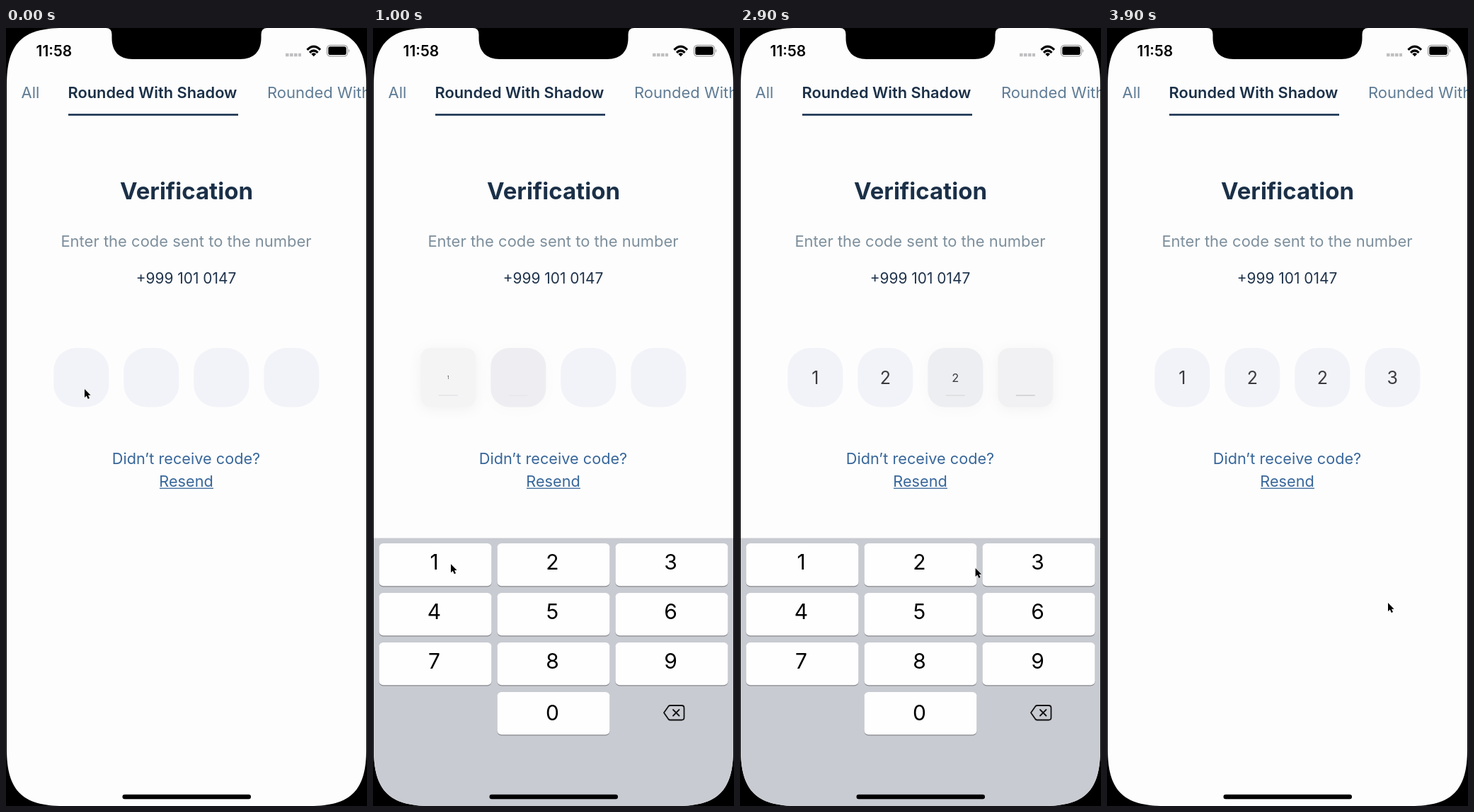
An HTML page for the animation above (4 s loop, 510 px wide and 1099 px high).

```html
<!DOCTYPE html>
<html lang="en">
<head>
<meta charset="utf-8">
<title>Verification</title>
<style>
  html, body { margin: 0; height: 100%; overflow: hidden; background: #000; }
  svg { display: block; width: 100vw; height: 100vh; }
  text { font-family: Inter, sans-serif; font-size: 22px; }
  .mid text { text-anchor: middle; }
  .tab { fill: #5f7c95; }
  .mid .link { fill: #38679a; font-size: 21.7px; }
  #keys text { font-size: 30px; }
  #cells text { font-size: 25px; fill: #3b3b40; }
</style>
</head>
<body>
<svg viewBox="0 0 510 1099">
  <clipPath id="screen">
    <path d="M1 80C1 22 23 0 81 0H429C487 0 509 22 509 80V1019C509 1077 487 1099 429 1099H81C23 1099 1 1077 1 1019Z"/>
  </clipPath>
  <rect width="510" height="1099"/>
  <g clip-path="url(#screen)">
    <rect width="510" height="1099" fill="#fdfdfd"/>

    <text class="tab" x="21.5" y="99">All</text>
    <text x="87.5" y="99" fill="#1b3048" style="font-size:21.8px;font-weight:600">Rounded With Shadow</text>
    <text class="tab" x="369" y="99">Rounded With</text>
    <rect x="88" y="121.2" width="240" height="2.6" fill="#17304f"/>

    <g class="mid">
      <text x="255" y="241.5" fill="#1b3048" style="font-size:33px;font-weight:700">Verification</text>
      <text x="254.5" y="309" fill="#7d8f9c">Enter the code sent to the number</text>
      <text x="254.5" y="361" fill="#20344c" style="font-size:20.9px">+999 101 0147</text>
      <text class="link" x="254.5" y="616">Didn’t receive code?</text>
      <text class="link" x="254.5" y="648">Resend</text>
    </g>
    <rect x="217" y="649.6" width="76" height="1.3" fill="#38679a"/>

    <g id="cells" class="mid"></g>

    <rect id="tint" y="728" width="510" height="371" fill="#faf9ff"/>
    <g id="keyboard">
      <rect y="720.5" width="510" height="380" fill="#c9cbd2"/>
      <g id="keys" class="mid"></g>
      <g fill="none" stroke="#111" stroke-width="1.8" stroke-linejoin="round" stroke-linecap="round">
        <path d="M420 957H436q3.5 0 3.5 3.5V974q0 3.5-3.5 3.5H420q-1.5 0-2.5-1l-6.5-9.2 6.5-9.3q1-1 2.5-1Z"/>
        <path d="M424 963l8.5 8.5m0-8.5l-8.5 8.5"/>
      </g>
    </g>
    <rect x="164.5" y="1082.8" width="181.5" height="6.4" rx="3.2"/>

    <text x="42.5" y="39.7" style="font-size:21px;font-weight:600">11:58</text>
    <path d="M395 38h22" stroke="#bfbfc1" stroke-width="4.6" stroke-dasharray="4.6 1.4"/>
    <g fill="none" stroke="#000" stroke-width="3.2">
      <path d="M425.5 30.8Q434.700 21.5 444 30.8"/>
      <path d="M429 34.8Q434.700 29.3 440.5 34.8"/>
    </g>
    <path d="M431.3 36.7Q434.700 33.8 438.2 36.7L434.7 40.3Z"/>
    <rect x="453.5" y="24.5" width="29" height="15.3" rx="4.5" fill="none" stroke="#a2a2a4" stroke-width="1.3"/>
    <rect x="455.3" y="26.3" width="25.4" height="11.7" rx="2.8"/>
    <path d="M484 29.5q2.4 2.6 0 5.3Z" fill="#a2a2a4"/>
  </g>
  <path d="M141 0Q149.500 0 149.500 9V14C149.500 33 160 44 179 44H331C350 44 360.500 33 360.500 14V9Q360.500 0 369 0Z"/>
  <path id="pointer" d="M0 0V12L2.8 9.5 4.8 14 7 13 5 8.8H8.6Z" stroke="#fff" paint-order="stroke"/>
</svg>

<script>
const LOOP = 4000, OPEN = 60, CLOSE = 3262.5, KEYBOARD_HEIGHT = 379;
const CODE = "1223";
const FOCUS = [OPEN, 930, 1860, 2765, CLOSE];  // cell i is active from FOCUS[i] to FOCUS[i + 1]
const PRESS = 90, FADE = 180;

// Pointer stops: time, x, y
const STOPS = [
  [0, 111, 510], [OPEN, 111, 510], [500, 139, 863], [830, 110, 758], [1100, 110, 757],
  [1500, 244, 759], [1760, 275, 761], [2100, 278, 761], [2780, 282, 762],
  [3020, 382, 764], [3300, 387, 763], [3900, 397, 812], [LOOP, 397, 812]
];

const byId = id => document.getElementById(id);
const clamp = v => Math.min(1, Math.max(0, v));
const mix = (a, b, k) => a + (b - a) * k;
const easeIn = v => clamp(v) ** 1.5;
const smooth = v => v * v * (3 - 2 * v);

function add(parent, tag, attrs, text = "") {
  const node = document.createElementNS("http://www.w3.org/2000/svg", tag);
  for (const name in attrs) node.setAttribute(name, attrs[name]);
  node.textContent = text;
  return parent.appendChild(node);
}

const keys = {};
[..."1234567890"].forEach((digit, i) => {
  const col = i === 9 ? 1 : i % 3, row = Math.floor(i / 3);
  const x = 8.5 + col * 167, y = 728 + row * 70;
  const box = { x, width: 159, height: 60.3, rx: 6 };
  add(byId("keys"), "rect", { ...box, y: y + 1.2, fill: "#85878c" });
  keys[digit] = add(byId("keys"), "rect", { ...box, y });
  add(byId("keys"), "text", { x: x + 78, y: y + (row === 3 ? 40 : 37) }, digit);
});

const cells = [...CODE].map((digit, i) => {
  const cx = 106.3 + i * 99;
  const group = byId("cells");
  return {
    cx,
    box: add(group, "rect", { x: cx - 39, y: 452, width: 78, height: 83.5 }),
    line: add(group, "rect", { x: cx - 13.5, y: 518.3, width: 27, height: 1.4, fill: "#606267" }),
    digit: add(group, "text", { y: 9 }, digit)
  };
});

function drawCell({ cx, box, line, digit }, i, t) {
  const filled = easeIn((t - FOCUS[i + 1]) / FADE);
  const active = easeIn((t - FOCUS[i]) / FADE) - filled;
  const shade = 40 * active * (1 - active);  // the shadow shows through midway
  const color = [242, 243, 248].map(c => Math.round(mix(c, 254, active) - shade));
  box.setAttribute("fill", `rgb(${color})`);
  box.setAttribute("rx", mix(32, 8, active));
  box.style.filter = active > 0 ? `drop-shadow(0 3px 9px rgba(0,0,0,${0.065 * active}))` : "none";
  const blink = 0.5 + 0.5 * Math.cos(2 * Math.PI * ((t - 500) / 1600 + 0.218));
  line.setAttribute("opacity", active * mix(0.15, 0.8, blink));
  digit.setAttribute("transform", `translate(${cx} 494) scale(${filled})`);
}

// Remaining distance of a critically damped spring
function spring(ms) {
  const u = 0.01826 * Math.max(0, ms);
  return (1 + u) * Math.exp(-u);
}

function drawKeyboard(t) {
  const hidden = t < CLOSE ? spring(t - OPEN) : 1 - spring(t - CLOSE);
  byId("keyboard").setAttribute("transform", `translate(0 ${KEYBOARD_HEIGHT * hidden})`);
  byId("tint").setAttribute("opacity", t < CLOSE ? 0 : clamp(1 - (t - CLOSE) / 440));
  for (const digit in keys) {
    const pressed = [...CODE].some((d, i) =>
      d === digit && t < FOCUS[i + 1] && t >= FOCUS[i + 1] - PRESS);
    keys[digit].setAttribute("fill", pressed ? "#abb0bb" : "#fefefe");
  }
}

function drawPointer(t) {
  const next = STOPS.findIndex(stop => stop[0] > t);
  const [t0, x0, y0] = STOPS[next - 1], [t1, x1, y1] = STOPS[next];
  const k = smooth((t - t0) / (t1 - t0));
  byId("pointer").setAttribute("transform", `translate(${mix(x0, x1, k)} ${mix(y0, y1, k)})`);
}

const start = performance.now();
function frame() {
  const t = (performance.now() - start) % LOOP;
  cells.forEach((cell, i) => drawCell(cell, i, t));
  drawKeyboard(t);
  drawPointer(t);
  requestAnimationFrame(frame);
}
frame();
</script>
</body>
</html>
```
